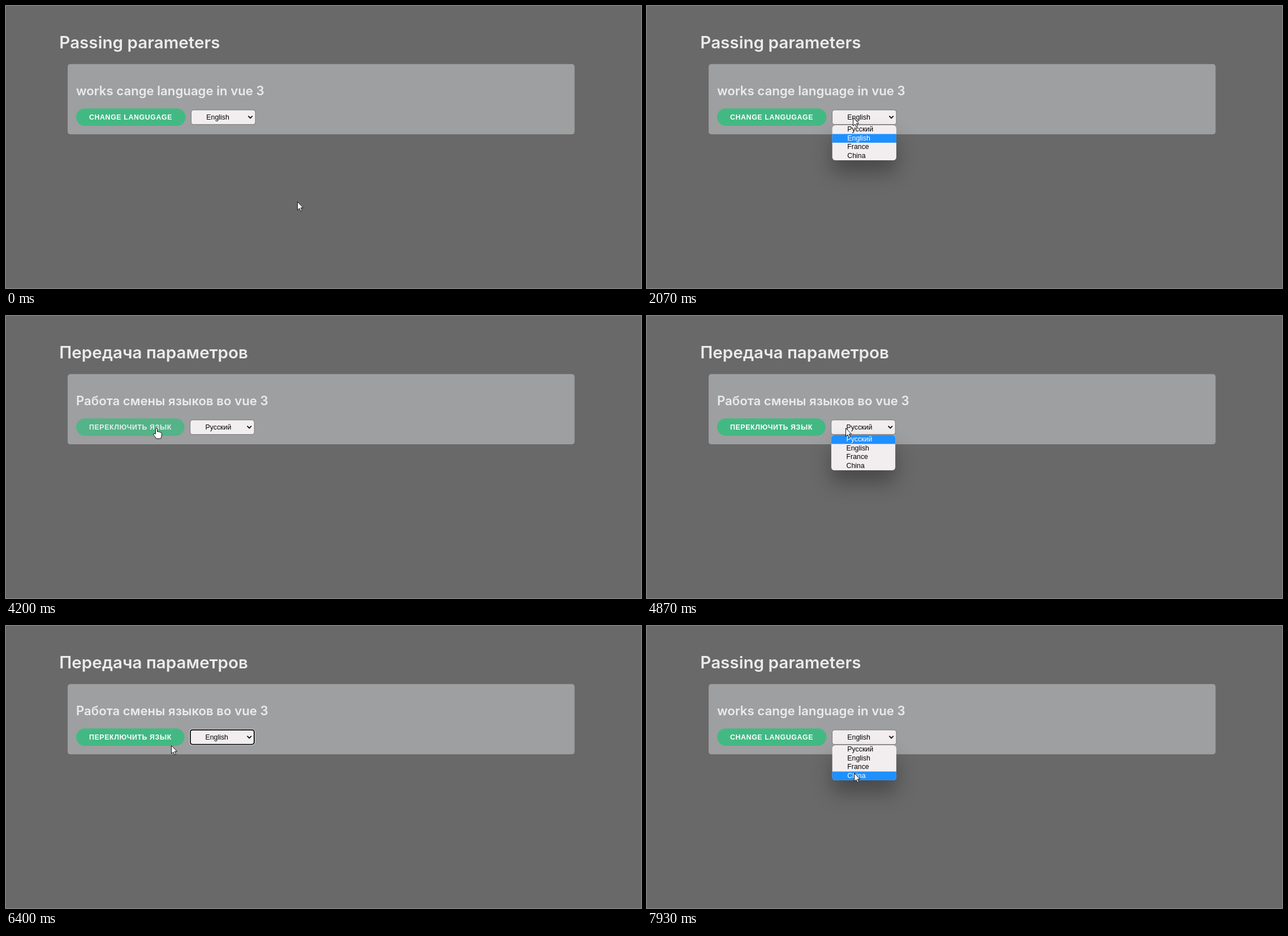
An HTML page for the animation above (8 s loop, 1123 px wide and 499 px high).

```html
<!DOCTYPE html>
<html lang="en">
<head>
<meta charset="utf-8">
<title>Language switch</title>
<style>
  html, body { margin: 0; width: 100%; height: 100%; overflow: hidden; background: #696969; }
  svg { display: block; width: 1123px; height: 499px; }
  text { white-space: pre; }
  .heading { font-family: Inter, sans-serif; font-weight: 600; font-optical-sizing: none; fill: #ebebeb; }
  #title { font-size: 29.6px; }
  #subtitle { font-size: 22.2px; }
  .control { font: 12.35px "Liberation Sans", Arial, sans-serif; }
  #label { font-weight: 700; letter-spacing: .617px; fill: #fff; }
  #menu { filter: drop-shadow(0 22px 17px rgba(0, 0, 0, .3)); }
</style>
</head>
<body>
<svg viewBox="0 0 1123 499">
  <defs>
    <clipPath id="menuShape"><rect x="327.7" y="211" width="113.2" height="62" rx="5.5"/></clipPath>
  </defs>
  <text id="title" class="heading" x="94.3" y="75"/>
  <rect x="109" y="102.8" width="896.5" height="124.2" rx="4.6" fill="#9e9fa0"/>
  <text id="subtitle" class="heading" x="123.9" y="158"/>

  <g id="button">
    <rect id="pill" x="124" y="181.3" height="30.6" rx="15.3" fill="#42b983"/>
    <text id="label" class="control" x="147" y="201"/>
  </g>

  <g id="select">
    <rect x="327.5" y="183.9" width="113.5" height="25.8" rx="4" fill="#f2eef0" stroke="#767676"/>
    <g id="ring" fill="none">
      <rect x="326.4" y="182.5" width="115.6" height="28.4" rx="5" stroke="#fff"/>
      <rect x="327.7" y="183.8" width="113" height="25.8" rx="4" stroke="#101010" stroke-width="1.9"/>
    </g>
    <text id="value" class="control" x="354.3" y="201"/>
    <path d="M428.4 194.6 l3.7 3.7 3.7-3.7" fill="none" stroke="#111" stroke-width="1.9"/>
    <g id="menu">
      <g clip-path="url(#menuShape)">
        <rect x="327" y="210" width="115" height="64" fill="#f2eef0"/>
        <rect id="highlight" x="327" width="115" height="15.4" fill="#1e90ff"/>
        <g id="options" class="control"></g>
      </g>
    </g>
  </g>

  <g id="cursor" fill="#fff" stroke="#111" stroke-linejoin="round">
    <path id="arrow" d="M.5 .5 V15 L3.8 11.9 L6.2 17 L8.5 16 L6.2 11 H10.6 Z"/>
    <path id="hand" d="M-1.5 10 V1 Q-1.5 -.5 0 -.5 T1.5 1 V6 Q3 4.8 4.3 6.3 Q5.8 5.3 7 7 Q9.3 6.4 9.3 8.6 V12 Q9.3 15 7.5 18 H-.5 Q-2 14.5 -5 11.5 Q-5.8 9.5 -4 9 Q-2.8 9 -1.5 10 Z"/>
  </g>
</svg>
<script>
const LOOP = 8000, TICK = 200 / 3;
const MENU_TOP = 211, ROW = 15.5;
const LANGUAGES = ['Русский', 'English', 'France', 'China'];
const PAGES = {
  en: { title: 'Passing parameters', subtitle: 'works cange language in vue 3', label: 'CHANGE LANGUGAGE', width: 193.5 },
  ru: { title: 'Передача параметров', subtitle: 'Работа смены языков во vue 3', label: 'ПЕРЕКЛЮЧИТЬ ЯЗЫК', width: 191.7 },
};

// Pointer stops: time, x, y
const STOPS = [
  [0, 515, 346], [70, 508, 343], [270, 508, 343], [1130, 262, 199],
  [1600, 364, 197], [2270, 364, 197], [2530, 367, 210], [2600, 367, 210],
  [2870, 348, 215], [3270, 348, 215], [3330, 344, 214], [3670, 262, 199],
  [4130, 262, 199], [4670, 351, 198], [5000, 351, 198], [5730, 360, 229],
  [6070, 360, 229], [6400, 292, 211], [6600, 262, 199], [6870, 262, 199],
  [7130, 365, 201], [7330, 365, 201], [7930, 366, 260],
];

const el = id => document.getElementById(id);
const show = (id, on) => el(id).style.display = on ? '' : 'none';
const within = (t, ...spans) => spans.some(([from, to]) => t >= from && t < to);

el('options').innerHTML = LANGUAGES.map((name, i) =>
  `<text x="354.3" y="${222.3 + i * ROW}">${name}</text>`).join('');

function pointer(t) {
  const next = STOPS.findIndex(stop => stop[0] > t);
  if (next < 0) return STOPS.at(-1).slice(1);
  if (next === 0) return STOPS[0].slice(1);
  const [t0, x0, y0] = STOPS[next - 1], [t1, x1, y1] = STOPS[next];
  const p = (t - t0) / (t1 - t0), eased = p * p * (3 - 2 * p);
  return [x0 + (x1 - x0) * eased, y0 + (y1 - y0) * eased];
}

function overButton(t) {
  const [x, y] = pointer(t);
  return x > 125 && x < 317 && y > 182 && y < 211;
}

function render(time) {
  const tick = Math.min(119, Math.floor((time % LOOP + 4) / TICK));
  const t = Math.round(tick * TICK / 10) * 10;
  const page = within(t, [3870, 6870]) ? PAGES.ru : PAGES.en;
  const selected = within(t, [3070, 6070]) ? 0 : 1;
  const open = within(t, [2070, 3070], [4870, 6070], [7200, LOOP]);
  const [x, y] = pointer(t);

  for (const id of ['title', 'subtitle', 'label']) el(id).textContent = page[id];
  el('pill').setAttribute('width', page.width);
  el('select').setAttribute('transform', `translate(${page.width - PAGES.en.width})`);
  el('value').textContent = LANGUAGES[selected];
  show('ring', within(t, [3070, 3730], [6070, 6800]));

  // Hover fades over the last few ticks
  const hover = [0, 1, 2, 3].filter(n => overButton(t - n * TICK)).length / 4;
  el('button').setAttribute('opacity', 1 - .2 * hover);

  show('menu', open);
  const active = y >= MENU_TOP ? Math.min(3, Math.floor((y - MENU_TOP) / ROW)) : selected;
  el('highlight').setAttribute('y', MENU_TOP + active * ROW);
  [...el('options').children].forEach((option, i) =>
    option.setAttribute('fill', i === active ? '#fff' : '#000'));

  const pointing = overButton(t);
  show('hand', pointing);
  show('arrow', !pointing);
  el('cursor').setAttribute('transform', `translate(${Math.round(x)} ${Math.round(y)})`);
}

function frame() {
  render(performance.now());
  requestAnimationFrame(frame);
}
frame();
</script>
</body>
</html>
```
